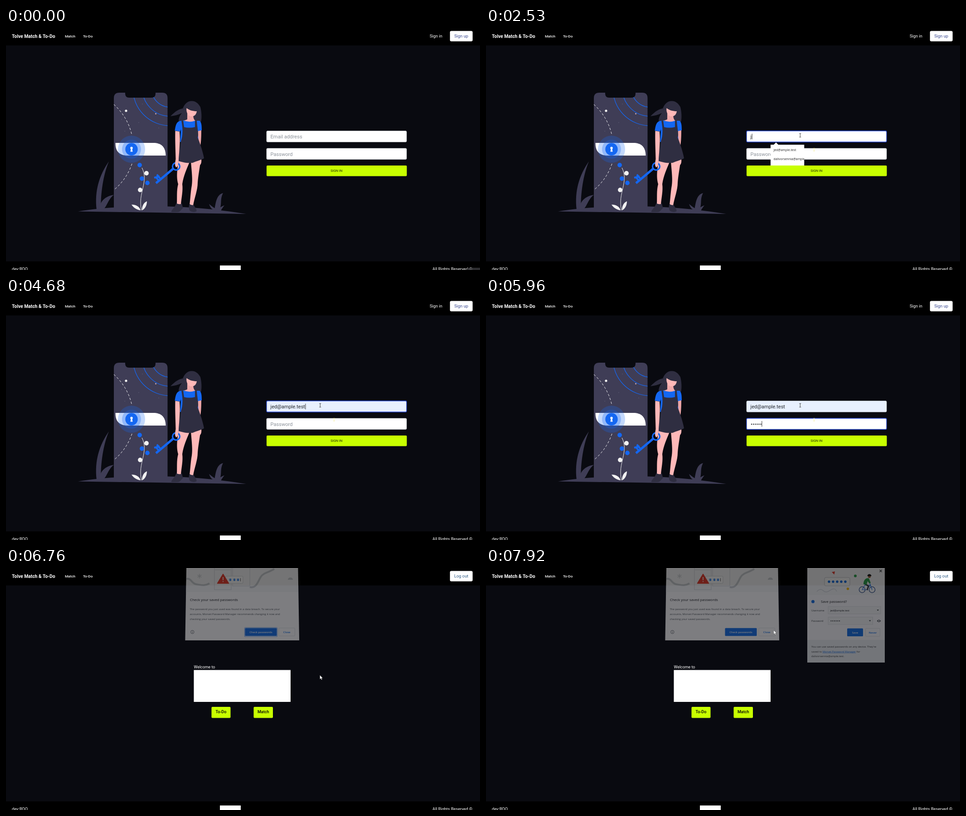
Recreate the animation shown at these times as an HTML page. Size 1046 px wide and 535 px high, loop 7.99 s.

```html
<!DOCTYPE html>
<html lang="en">
<head>
<meta charset="utf-8">
<title>Sign in walkthrough</title>
<style>
  html, body { margin: 0; width: 100%; height: 100%; overflow: hidden; background: #090a10; }
  svg { display: block; }
  #stage { width: 100vw; height: 100vh; }
  text { font-family: Roboto, Inter, sans-serif; white-space: pre; }
  .sys { font-family: "Open Sans", "Noto Sans", sans-serif; }
</style>
</head>
<body>
<svg id="stage" viewBox="0 0 1046 535" xmlns="http://www.w3.org/2000/svg"></svg>
<script>
const LOOP = 7990;
const LIME = '#c8ff00', BLUE = '#1467f2', SLATE = '#3f3d56', INK = '#2f2e41', SKIN = '#ffb8b8', LINK = '#1a73e8';
const MAIL = 'jed@ample.test', LONG_MAIL = 'dalivorsennia@ample.test';

// Markup helpers
const path = (d, fill, more = '') => `<path d="${d}" fill="${fill}" ${more}/>`;
const line = (d, color, width = 1, more = '') => path(d, 'none', `stroke="${color}" stroke-width="${width}" ${more}`);
const dot = (x, y, r, fill, more = '') => `<circle cx="${x}" cy="${y}" r="${r}" fill="${fill}" ${more}/>`;
const rect = (x, y, w, h, fill, more = '') =>
  `<rect x="${x}" y="${y}" width="${w}" height="${h}" fill="${fill}" ${more}/>`;
const text = (x, y, size, str, fill = '#fff', more = '') =>
  `<text x="${x}" y="${y}" font-size="${size}" fill="${fill}" ${more}>${str}</text>`;
const sys = (x, y, size, str, fill = '#3c4043', more = '') => text(x, y, size, str, fill, `class="sys" ${more}`);
const group = (id, body) => `<g id="${id}">${body}</g>`;
const medium = 'font-weight="500"', mid = 'text-anchor="middle"';

const frame = () =>
  rect(0, 0, 1046, 535, '#090a10') + rect(0, 0, 1046, 38.5, '#000') + rect(0, 516, 1046, 19, '#000') +
  text(13, 21.5, 10.3, 'Tolve Match &amp; To-Do', '#fff', 'font-weight="700"') +
  text(130, 20.5, 8.1, 'Match', '#fff', medium) + text(170, 20.5, 8.1, 'To-Do', '#fff', medium) +
  text(13, 536, 9.2, 'dev:RQO') + rect(472, 525, 46, 10, '#fff') +
  text(941, 536, 9.2, 'All Rights Reserved ©') +
  `<rect id="status" x="1018" y="530" width="28" height="5" fill="#3c3c40" opacity=".75"/>`;

const pill = (label, color) => rect(979.7, 6.5, 50, 23, '#fff', 'rx="3"') +
  text(1004.7, 21, 9.3, label, color, mid);

function phone() {
  const arcs = [41, 61, 82].map(r =>
    `<circle cx="362" cy="134" r="${r}" fill="none" stroke="${BLUE}" stroke-width="1.3"/>`).join('');
  const specks = [[301, 168], [255, 202], [293, 209], [262, 228], [337, 221]]
    .map(([x, y]) => dot(x, y, .8, '#626079')).join('');
  const shape = 'M238 155Q238 143 250 143H263V145Q263 154 272 154H321Q330 154 330 145V143H345Q356.500 143 356.500 155V406H238Z';
  const dash = 'stroke-dasharray="5 4"';
  return `<clipPath id="screen"><path d="${shape}"/></clipPath>` + path(shape, SLATE) +
    `<g clip-path="url(#screen)">${arcs}</g>` + specks +
    line('M238 169A127 127 0 0 1 278 238', '#fff', 1, dash) +
    line('M278 300A127 127 0 0 1 238 358', '#fff', 1, dash) +
    dot(265, 183, 2.6, '#f2f2f2') + dot(330.5, 189.5, 1.5, '#c9a9b2') +
    path('M241.500 254H329Q352 256 352.500 282H265Q241 280 241.500 254Z', '#fff') +
    dot(277, 268, 30, BLUE, 'opacity=".25"') + dot(277, 268, 21, BLUE, 'opacity=".28"') +
    dot(277, 268, 13.7, BLUE) + dot(277, 265.3, 2.7, '#fff') + path('M276 266h2.200l1.300 7.500h-5z', '#fff');
}

const ground = () =>
  path('M159 405.500C215 396 290 393 357 394.500C420 396 480 403 530 411C400 409.500 280 407 159 405.500Z', SLATE) +
  path('M227 295C206 325 195 360 200 402L210 402C208 380 212 330 227 295Z', SLATE) +
  path('M207 402C205 384 220 371 238 369C225 378 222 398 213 402Z', SLATE) +
  path('M479 365C465 368 463 385 460 402L470 404C478 390 471 380 479 365Z', SLATE) +
  path('M448 389C452 399 454 401 461 403L463 400C458 397 453 393 448 389Z', SLATE) +
  path('M482 392C474 395 468 399 467 404L474 404C476 400 479 396 482 392Z', SLATE);

const flower = () => line('M300 309C316 340 290 365 299 403', '#f2f2f2') +
  path('M277 390.500C288 390 295 396 297 403C288 402 281 397 277 390.500Z', '#f2f2f2') +
  path('M311 383C302 387 300 396 300 403C307 400 311 392 311 383Z', '#f2f2f2') +
  dot(295, 303, 4.9, BLUE) + dot(300, 333, 4.9, BLUE) + dot(312, 342.500, 4.9, BLUE) +
  dot(310, 321, 4.9, '#f2f2f2') + dot(296, 358, 4.9, '#f2f2f2');

function woman() {
  return path('M363 195C375 183 382 179 390 178C395 166 402 161 410 161.500C418 161 425 167 429 175C432 188 432 198 430.500 207L381 207C381 198 384 193 388 188C380 192 372 194 363 195Z', INK) +
    path('M400 189L400 202Q394 205 389 205V225H418V205Q413 203 413 190Z', '#f0a9aa') +
    path('M398.500 177C397 186 402 195.500 409 195.500C416 195.500 420 191 421 184C412 184 405 182 398.500 177Z', SKIN) +
    path('M424 226L431 225C431 245 430 258 428 263L421 245Z', '#eda5a7') +
    path('M424 290H431C432 297 430 304 425 304Z', SKIN) +
    path('M384 205.500C376 207 374 216 372.500 227L384 229L386 224L384 252L425 252L423 228L432 226C432 214 431 208 427 205L417 205Q404 210 391 204Z', BLUE) +
    path('M381 294C376 320 377 335 380 345C376 360 378 375 377 389L386 390C387 375 391 360 389 345C392 325 399 312 405 296Z', SKIN) +
    path('M408 295C410 320 412 335 410 348C407 365 407 378 405 391L413 392C416 375 423 358 423 342C424 328 427 312 430 291Z', SKIN) +
    path('M376 387Q382 392 388 388L390.500 398C386 402 384 407 378 407L365 407C364 402 372 399 376 387Z', INK) +
    path('M405 389Q410 393 414 391C417 397 421 400 420.500 405C416 408 408 407 405 403C403 398 403 393 405 389Z', INK) +
    path('M387 205L391 204L393 219Q404 222 417 219L417 205L421 205C422 222 426 235 423 242C430 260 435 276 437 288C428 293 420 294 412 298C398 299 388 297 379 293C382 275 385 260 386 250C390 240 391 225 387 205Z', INK) +
    line('M369 311L331 343', BLUE, 5) + line('M338 338L330 329M342 335L333 324M327 331L339 328', BLUE, 4) +
    dot(375.500, 306, 8, 'none', `stroke="${BLUE}" stroke-width="3.300"`) +
    path('M373.500 227.500L383 229C385 250 382 275 381 290C381 300 379 307 376 308C372 306 373 298 374.500 290C374 268 373 250 373.500 227.500Z', SKIN);
}

const field = (id, y) => `<rect id="${id}" x="575" y="${y}" width="309" height="24.500" rx="2.200" fill="#fff"/>`;

const login = () => pill('Sign up', '#3a4a92') + text(935, 21, 9.3, 'Sign in') +
  ground() + phone() + flower() + woman() +
  field('mailBox', 227.5) + field('passBox', 266) +
  text(583.5, 244, 11.2, 'Email address', '#8b9199', 'id="mailHint"') +
  text(583.5, 282.5, 11.1, 'Password', '#8b9199', 'id="passHint"') +
  text(583.5, 244, 11, '', '#212529', 'id="mail"') +
  sys(583.5, 243.5, 6.9, MAIL, '#222', 'id="preview"') + group('dots', '') +
  `<rect id="caret" width="1" height="12.500" fill="#333"/>` +
  `<rect id="submit" x="575" y="304" width="309.500" height="23.500" rx="2"/>` +
  text(729.3, 318.3, 7.5, 'SIGN IN', '#1c2400', mid) +
  line('M722.500 266h3M724 266v6M722.500 272h3', '#f3ee8a', .8, 'id="trail"') +
  group('popup', path('M634.500 258.500L640 253L645.500 258.500Z', '#fff') +
    `<svg id="list" x="628" y="258">${rect(0, 0, '100%', '100%', '#fff')}
      <rect id="row" width="100%" height="100%" fill="#e6e6e6"/>
      ${sys(6.5, 14, 6.9, MAIL, '#222')}${sys(6.5, 34, 6.9, LONG_MAIL, '#222', 'id="second"')}</svg>`);

const limeButton = (x, w, label) => rect(x, 307, w, 24.5, LIME, 'rx="2"') +
  text(x + w / 2, 321.2, 9.1, label, '#000', `${mid} ${medium}`);

const home = () => pill('Log out', '#2d5a86') + text(414.5, 222, 8.9, 'Welcome to') +
  rect(414.5, 225.5, 213.5, 70.5, '#fff') + limeButton(453.5, 42, 'To-Do') + limeButton(546.5, 42.5, 'Match');

const solid = (x, y, w, label) => rect(x, y, w, 17.5, LINK, 'rx="1.500"') +
  sys(x + w / 2, y + 11, 6.1, label, '#fff', `${mid} font-weight="600"`);
const hollow = (x, y, w, label) => rect(x, y, w, 17.5, 'none', 'rx="1.500" stroke="#dadce0" stroke-width=".8"') +
  sys(x + w / 2, y + 11, 6.1, label, LINK, `${mid} font-weight="600"`);

const checkArt = () => path('M398.500 0H644L644.500 53H397.500Z', '#f6f7f8') +
  line('M398 24C410 22 408 34 420 36S438 40 449 34', '#cbced2', 4) +
  line('M538 42C552 46 556 30 562 20S580 10 592 2', '#cbced2', 4) +
  line('M427 13v10M422.500 15.500l9 5M422.500 20.500l9-5', '#cbced2', 1.3) +
  path('M622 26a5.500 5 0 0 1 11 0z', '#cbced2') +
  rect(460, -4, 37, 52, '#f6f7f8', 'stroke="#d3d6da"') + rect(500, -4, 38, 44, '#f6f7f8', 'stroke="#d3d6da"') +
  line('M461 4H496', '#d3d6da') + rect(484, 18, 39, 16, '#fff', 'rx="2" stroke="#d3d6da"') +
  [495, 504, 512].map(x => line(`M${x} 23v6M${x - 2.6} 24.500l5.200 3M${x - 2.6} 27.500l5.200-3`, LINK, 1.2)).join('') +
  line('M517.500 22.500v7', '#5f6368') +
  path('M479 13.500L491.500 34H466.500Z', '#ea4335', 'stroke="#ea4335" stroke-width="1.500" stroke-linejoin="round"') +
  line('M479 20v7M479 29v2', '#fff', 1.6);

const check = () => `<path id="sheet" fill="#fff"/>` + checkArt() +
  sys(406, 72.8, 7.9, 'Check your saved passwords', '#202124') +
  ['The password you just used was found in a data breach. To secure your',
   'accounts, Morvet Password Manager recommends changing it now and',
   'checking your saved passwords.'].map((s, i) => sys(405.5, 92.5 + i * 11.3, 6, s, '#4d5156')).join('') +
  dot(411.3, 141.5, 3.7, 'none', 'stroke="#5f6368" stroke-width=".8"') + line('M411.300 139v1M411.300 141v2.700', '#5f6368', .9) +
  `<rect id="ring" x="526.500" y="131.500" width="72" height="20.500" rx="2" fill="none" stroke="#8ab4f8" stroke-width="1.200"/>` +
  solid(527.5, 132.7, 70, 'Check passwords') + hollow(602, 132.7, 35.5, 'Close');

const rider = () => [830, 852].map(x => dot(x, 48, 6.6, 'none', 'stroke="#24457f" stroke-width="1.200"')).join('') +
  line('M830 48L836 38H848L840 48H830M852 48L847 34', LINK, 1.2) + line('M836 35L844 40L841 49', '#3c4043', 3) +
  path('M833 36C833 27 838 21 845 23L849 33L846 34L842 29L840 37Z', '#34a853') + dot(846, 19, 3, '#a5673f') +
  path('M841.500 18a4.500 4.500 0 0 1 9 0z', '#202124');

const save = () => rect(709, -4, 171, 213, '#fff', 'rx="2"') + rect(709, 0, 171, 60, '#f8f9fa') +
  rect(709, 159, 171, 50, '#f1f3f4') +
  line('M730 52q8-8 14-2t16-1t14 3', '#d3d6da', 1.2) + rect(747, 21, 56, 18.5, '#fff', 'rx="3" stroke="#c6c9cd"') +
  [757, 766, 775, 784, 793].map(x => dot(x, 30.3, 2.7, LINK)).join('') +
  path('M763 9L770 7.500L768.500 14.500Z', '#ea4335') + dot(798.5, 46, 2.7, '#fbbc04') + dot(815, 17.5, 3, '#34a853') + rider() +
  line('M868.500 4l5 5M873.500 4l-5 5', '#3c4043', 1.1) + dot(721.5, 74.3, 3.5, LINK) +
  sys(739, 77, 7.8, 'Save password?', '#202124') +
  sys(718, 95.5, 5.9, 'Username') + sys(718, 119, 5.9, 'Password') +
  [[85, 116], [108.5, 98.5]].map(([y, w]) => rect(755, y, w, 16.5, '#f8f9fa', 'stroke="#dadce0" stroke-width=".700"') +
    path(`M${755 + w - 8.5} ${y + 7}h4.500l-2.250 2.700z`, '#3c4043')).join('') +
  sys(759.5, 95.5, 5.9, MAIL, '#202124') +
  [0, 1, 2, 3, 4, 5].map(i => dot(761.5 + i * 3.7, 117, 1.1, '#202124')).join('') +
  path('M862.500 117q4.500-5.500 9 0q-4.500 5.500-9 0z', '#5f6368') + dot(867, 117, 1.4, '#fff') +
  solid(797, 133.5, 35, 'Save') + hollow(837.5, 133.5, 32, 'Never') +
  sys(718, 176, 5.9, "You can use saved passwords on any device. They're") +
  sys(718, 186.6, 5.9, `saved to <tspan fill="${LINK}" text-decoration="underline">Morvet Password Manager</tspan> for`) +
  sys(718, 197, 5.9, LONG_MAIL + '.');

const pointers = () => `<ellipse id="halo" cx="692" cy="236.800" rx="7" ry="6.500" fill="#fbf76a"/>` +
  line('M-2 -4h1.500q.5 0 .5.500q0-.500.500-.500h1.500M0-3.500v7M-2 4h4', '#333', .9, 'id="beam"') +
  path('M0 0V8.800L2 7L3.500 10.300L5 9.600L3.500 6.500H6.300Z', '#fff', 'id="arrow" stroke="#222" stroke-width=".400"');

document.getElementById('stage').innerHTML = frame() + group('login', login()) + group('home', home()) +
  group('check', check()) + group('save', save()) + pointers();

const el = {};
document.querySelectorAll('[id]').forEach(n => { el[n.id] = n; });
const set = (id, attrs) => { for (const k in attrs) el[id].setAttribute(k, attrs[k]); };
const show = (id, on) => set(id, { display: on ? 'inline' : 'none' });
const fade = (id, a) => { show(id, a > 0); set(id, { opacity: a }); };

// Value of the last [time, value] step already reached
const step = (t, steps) => steps.reduce((v, [at, next]) => t >= at ? next : v, steps[0][1]);
const within = (t, a, b) => t >= a && t < b;
// Progress in 70 ms ticks
const ticks = (t, start, count) => Math.max(0, Math.min(1, Math.floor((t - start) / 70) / count));
const lerp = (a, b, p) => a + (b - a) * p;

function drawForm(t) {
  const previewing = within(t, 3480, 4470), filled = t >= 4470;
  const typed = filled ? MAIL : previewing ? '' : MAIL.slice(0, step(t, [[0, 0], [2460, 1], [2730, 2], [2930, 3]]));
  const dots = step(t, [[0, 0], [5420, 1], [5490, 2], [5630, 3], [5900, 5], [5960, 6]]);
  const onMail = within(t, 1410, 4880), onPass = t >= 4880;
  const edge = on => ({ stroke: on ? '#2446cf' : '#ced4da', 'stroke-width': on ? 1.3 : .7 });
  set('mailBox', { fill: previewing || filled ? '#e8f0fe' : '#fff', ...edge(onMail) });
  set('passBox', edge(onPass));
  show('mailHint', !typed && !previewing);
  show('passHint', dots === 0);
  show('preview', previewing);
  if (el.mail.textContent !== typed) el.mail.textContent = typed;
  el.dots.innerHTML = Array.from({ length: dots }, (_, i) => dot(586 + i * 4.1, 279, 1.2, '#212529')).join('');

  const caretOn = within(t, 1410, 1930) || within(t, 2460, 3480) || t >= 4540;
  show('caret', caretOn);
  set('caret', onPass ? { x: 584 + dots * 4.05, y: 272 }
    : { x: 584 + (typed ? el.mail.getComputedTextLength() : 0), y: 233.7 });

  show('popup', within(t, 2460, 4470));
  set('list', {
    width: step(t, [[0, 106], [2530, 74.5], [2730, 74], [2930, 72]]),
    height: step(t, [[0, 122], [2530, 46], [2730, 43], [2930, 23.5]])
  });
  show('row', previewing);
  show('second', t < 2930);
  show('trail', t >= 660);
}

function drawPointer(t) {
  const inP = Math.sin(ticks(t, 240, 8) * Math.PI / 2);
  let x = lerp(947, 693.3, inP), y = lerp(496, 237.2, inP);
  const overField = within(y, 227, 252.5) || within(y, 266, 291);
  const beam = t < 6360 && overField;
  set('submit', { fill: t >= 240 && within(y, 304, 328) ? '#b4e600' : LIME });
  if (t >= 6360) {
    const p = ticks(t, 7030, 9), e = p * p * (3 - 2 * p);
    x = lerp(692.7, 634.8, e);
    y = lerp(237, 137.5, e);
  }
  const at = { transform: `translate(${x} ${y})` };
  set('beam', at);
  set('arrow', at);
  show('beam', t >= 240 && beam);
  show('arrow', t >= 240 && !beam);
  fade('halo', step(t, [[0, 0], [1330, 1], [1410, .8], [1530, .4], [1600, 0]]));
}

function render(t) {
  const home = t >= 6360;
  show('status', t < 70);
  show('login', !home);
  show('home', home);
  drawForm(t);

  const a = step(t, [[0, 0], [6760, .47], [6830, .8], [6900, 1], [7850, .8], [7920, .47]]);
  const tilt = (1 - a) * 2;
  fade('check', a);
  set('sheet', { d: `M${397 + tilt} 0H${645.5 - tilt}L${645.5 + tilt * 1.5} 160H${397 - tilt * 1.5}Z` });
  show('ring', t < 7780);
  fade('save', step(t, [[0, 0], [7850, .25], [7920, .46]]));
  drawPointer(t);
}

const start = performance.now();
function tick() {
  render((performance.now() - start) % LOOP);
  requestAnimationFrame(tick);
}
tick();
</script>
</body>
</html>
```
